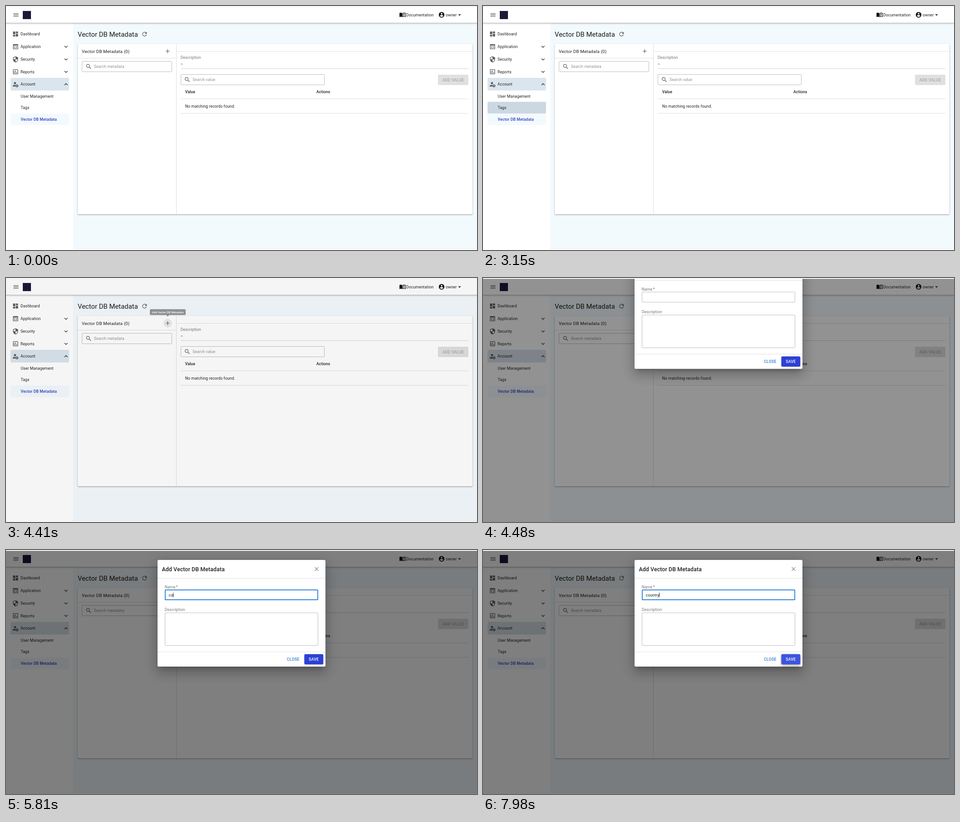
An HTML page with a canvas for the animation above (8 s loop, 1038x540 px).

```html
<!DOCTYPE html>
<html lang="en">
<head>
<meta charset="utf-8">
<title>Vector DB Metadata</title>
<style>
  html, body { margin: 0; width: 100%; height: 100%; overflow: hidden; background: #fff; }
  canvas { display: block; width: 1038px; height: 540px; }
</style>
</head>
<body>
<canvas id="stage" width="1038" height="540"></canvas>
<script>
const ctx = document.getElementById('stage').getContext('2d');
const LOOP = 8000, STEP = 70;
const UNIT = 0.62; // stage pixels per CSS pixel of the interface
const BODY = 14 * UNIT;
const INK = '#202020', GREY = '#757575', LINE = '#dedede', BORDER = '#bdbdbd';

const ICONS = {
  menu: 'M3 18h18v-2H3zm0-5h18v-2H3zm0-7v2h18V6z',
  book: 'M1 5.5C4 4 8 4 11.300 6v14.500C8 18.500 4 18.500 1 20zM12.700 6C16 4 20 4 23 5.500V20c-3-1.500-7-1.500-10.300.5zM14.500 7.500v10.300c2-.7 4.500-.7 6.700 0V7c-2.200-.7-4.700-.5-6.700.5zM16 10l4-.5v1.300l-4 .5zM16 13l4-.5v1.300l-4 .5z',
  user: 'M12 2a10 10 0 100 20 10 10 0 000-20zM12 5a3 3 0 110 6 3 3 0 010-6zM12 19.200c-2.500 0-4.710-1.280-6-3.220.03-1.990 4-3.080 6-3.080s5.970 1.090 6 3.080c-1.290 1.940-3.500 3.220-6 3.220z',
  drop: 'M7 10l5 5 5-5z',
  dashboard: 'M3 13h8V3H3zM3 21h8v-6H3zM13 21h8V11h-8zM13 3v6h8V3z',
  code: 'M3 3h18v18H3zM5 8v11h14V8zM10 9.500l1.200 1.200-2.700 2.800 2.700 2.800L10 17.500l-4-4zM14 9.500l-1.200 1.200 2.700 2.800-2.700 2.800 1.200 1.200 4-4z',
  shield: 'M12 1L3 5v6c0 5.550 3.840 10.740 9 12 5.160-1.260 9-6.450 9-12V5zM12 12h7c-.53 4.120-3.280 7.790-7 8.940V12H5V6.300l7-3.110z',
  chart: 'M5 3h14a2 2 0 012 2v14a2 2 0 01-2 2H5a2 2 0 01-2-2V5a2 2 0 012-2zM5 5v14h14V5zM7 10h2v7H7zM11 7h2v10h-2zM15 13h2v4h-2z',
  account: 'M10 4a4 4 0 100 8 4 4 0 000-8zM2 20v-2c0-3 4.500-4.300 9.700-4a7 7 0 00-.2 6zM16 12h2l.4 1.500 1.600.8 1.500-.4 1 1.700-1 1.200v1.400l1 1.200-1 1.700-1.500-.4-1.600.8L18 23h-2l-.4-1.500-1.600-.8-1.500.4-1-1.700 1-1.200v-1.400l-1-1.200 1-1.700 1.500.4 1.600-.8zM17 15.700a1.800 1.800 0 100 3.600 1.800 1.800 0 000-3.600z',
  down: 'M16.590 8.590L12 13.170 7.410 8.590 6 10l6 6 6-6z',
  up: 'M12 8l-6 6 1.410 1.410L12 10.830l4.590 4.580L18 14z',
  refresh: 'M17.650 6.350A8 8 0 1019.730 14h-2.080A6 6 0 1116.220 7.780L13 11h7V4z',
  search: 'M15.500 14h-.79l-.28-.27A6.500 6.500 0 1013.730 14.430l.27.28v.79l5 4.990L20.490 19zM9.500 14a4.500 4.500 0 110-9 4.500 4.500 0 010 9z',
  add: 'M19 13h-6v6h-2v-6H5v-2h6V5h2v6h6z',
  close: 'M19 6.100L17.900 5 12 10.900 6.100 5 5 6.100l5.900 5.900L5 17.900 6.100 19l5.900-5.900 5.900 5.900 1.100-1.100-5.900-5.900z'
};
for (const name in ICONS) ICONS[name] = new Path2D(ICONS[name]);

function icon(name, cx, cy, color = '#5c5c5c') {
  ctx.save();
  ctx.translate(cx - 12 * UNIT, cy - 12 * UNIT);
  ctx.scale(UNIT, UNIT);
  ctx.fillStyle = color;
  ctx.fill(ICONS[name], 'evenodd');
  ctx.restore();
}

// cy is the middle of the capital letters
function text(str, x, cy, { color = INK, size = BODY, weight = 400, gap = 0.0107, align = 'left' } = {}) {
  ctx.font = `${weight} ${size}px Roboto, sans-serif`;
  ctx.letterSpacing = `${gap * size}px`;
  ctx.textAlign = align;
  ctx.fillStyle = color;
  ctx.fillText(str, x, cy + size * 0.36);
}

function rect(x, y, w, h, color) {
  ctx.fillStyle = color;
  ctx.fillRect(x, y, w, h);
}

function box(x, y, w, h, r, color) {
  ctx.fillStyle = color;
  ctx.beginPath();
  ctx.roundRect(x, y, w, h, r);
  ctx.fill();
}

function outline(x, y, w, h, color = BORDER, width = 1) {
  ctx.strokeStyle = color;
  ctx.lineWidth = width;
  ctx.beginPath();
  ctx.roundRect(x + width / 2, y + width / 2, w - width, h - width, 1);
  ctx.stroke();
}

function withShadow(alpha, blur, dy, draw) {
  ctx.save();
  ctx.shadowColor = `rgba(0,0,0,${alpha})`;
  ctx.shadowBlur = blur;
  ctx.shadowOffsetY = dy;
  draw();
  ctx.restore();
}

const between = (t, a, b) => t >= a && t < b;
const clamp = v => Math.min(1, Math.max(0, v));
const easeOut = v => 1 - (1 - clamp(v)) ** 3;

function drawHeader() {
  withShadow(0.38, 4, 1, () => rect(-10, 0, 1058, 37, '#fff'));
  rect(0, 1, 1038, 1, '#ececec');
  icon('menu', 22, 19.7);
  rect(37, 11, 18, 18, '#1b1838');
  icon('book', 874, 19.5, '#111');
  text('Documentation', 882, 19.5);
  icon('user', 960, 19.5, '#111');
  text('owner', 969, 19.5);
  icon('drop', 999.5, 19.7, '#111');
}

function drawSidebar(t) {
  const rows = [
    ['Dashboard', 'dashboard', 62], ['Application', 'code', 90, 'down'],
    ['Security', 'shield', 118, 'down'], ['Reports', 'chart', 145.5, 'down'],
    ['Account', 'account', 173.3, 'up']
  ];
  box(10, 159, 129, 28, 2.5, '#dae5ee');
  for (const [label, glyph, y, arrow] of rows) {
    icon(glyph, 21, y);
    text(label, 32, y);
    if (arrow) icon(arrow, 132.3, y, INK);
  }
  const hover = '#ccd8e1';
  if (between(t, 3150, 3220)) box(10, 212, 129, 26, 2.5, hover);
  box(10, 238, 129, 25.500, 2.5, between(t, 2100, 3150) ? hover : '#f3fafe');
  text('User Management', 32.5, 199.7);
  text('Tags', 32.5, 225.2);
  text('Vector DB Metadata', 32.5, 250.6, { color: '#2f41c4', weight: 500 });
}

function drawPage(t) {
  rect(148, 38, 890, 498, '#f3fafe');
  rect(148, 536, 890, 1, '#e6ebee');
  text('Vector DB Metadata', 158, 62.3, { size: 24 * UNIT, gap: 0, color: '#1a1a1a' });
  icon('refresh', 305.3, 62.3);

  withShadow(0.42, 2.5, 1, () => box(158, 84, 870, 377, 2.5, '#fff'));
  rect(375, 84, 1, 377, LINE);
  rect(158, 115, 217, 1, LINE);
  rect(376, 100, 652, 1, '#e4e4e4');

  text('Vector DB Metadata (0)', 167, 100.2, { size: 16 * UNIT, gap: 0.0094 });
  if (between(t, 4200, 4480)) {
    ctx.fillStyle = '#ececec';
    ctx.beginPath();
    ctx.arc(356.3, 100, 9.7, 0, Math.PI * 2);
    ctx.fill();
  }
  icon('add', 356.3, 100);
  outline(167, 122, 199, 24, between(t, 3430, 3570) ? '#303030' : BORDER);
  icon('search', 182.3, 134);
  text('Search metadata', 193.7, 134, { color: '#929292' });

  text('Description', 384.8, 113.7, { color: GREY });
  text('--', 385, 128.3);
  rect(385, 138, 634, 1, '#d2d2d2');
  outline(385, 151, 317, 24);
  icon('search', 399.7, 163);
  text('Search value', 411, 163, { color: '#929292' });
  box(952, 152, 67, 23, 2.5, '#e0e0e0');
  text('ADD VALUE', 985.5, 163.4, { color: '#a6a6a6', weight: 500, gap: 0.0286, align: 'center' });
  text('Value', 394.7, 189.8, { weight: 500 });
  text('Actions', 684, 189.8, { weight: 500 });
  rect(385, 205, 634, 1, LINE);
  text('No matching records found.', 394.7, 221.4);
  rect(385, 237, 634, 1, LINE);
}

function drawTooltip(t) {
  if (!between(t, 4270, 4480)) return;
  ctx.save();
  ctx.globalAlpha = t < 4340 ? 0.5 : t < 4410 ? 0.92 : 0.66;
  ctx.fillStyle = '#616161';
  ctx.beginPath();
  ctx.roundRect(317, 69, 79, 13, 2.5);
  ctx.moveTo(353, 82);
  ctx.lineTo(359.500, 82);
  ctx.lineTo(356.3, 85.2);
  ctx.fill();
  ctx.globalAlpha = 1;
  text('Add Vector DB Metadata', 356.5, 75.6,
    { size: 10 * UNIT, weight: 500, gap: 0.012, color: '#fff', align: 'center' });
  ctx.restore();
}

function drawBackdrop(t) {
  if (t < 4410) return;
  rect(0, 2, 1038, 538, `rgba(0,0,0,${0.5 * easeOut((t - 4406) / 155)})`);
}

function drawNameField(t) {
  const focused = t >= 5250, hovered = t >= 4970;
  outline(350, 87.5, 338, 23.5, focused ? '#1976d2' : hovered ? '#303030' : BORDER, focused ? 1.7 : 1);
  if (!focused) return;
  const keyTimes = [5600, 5810, 6020, 6230, 6510, 6650, 6790];
  const typed = 'country'.slice(0, keyTimes.filter(k => t >= k).length);
  text(typed, 358.8, 99.4);
  if (!between(t, 7350, 7840)) {
    rect(358.8 + ctx.measureText(typed).width - 0.3, 94.5, 0.9, 10, '#111');
  }
}

function drawDialog(t) {
  if (t <= 4410) return;
  const x = 334, y = 22, w = 370, h = 236;
  ctx.save();
  ctx.beginPath();
  ctx.rect(0, 2, 1038, 538);
  ctx.clip();
  ctx.translate(0, -258 * (1 - easeOut((t - 4410) / 177)));

  const layers = [[0.2, 15, 11, -7], [0.14, 38, 24, 3], [0.12, 46, 9, 8]];
  for (const [alpha, blur, dy, spread] of layers) {
    const s = spread * UNIT;
    // The caster sits off stage so that only its shadow shows
    ctx.save();
    ctx.shadowOffsetX = 3000;
    ctx.shadowOffsetY = dy * UNIT;
    ctx.shadowBlur = blur * UNIT;
    ctx.shadowColor = `rgba(0,0,0,${alpha})`;
    box(x - s - 3000, y - s, w + 2 * s, h + 2 * s, 2.5 + Math.max(0, s), '#000');
    ctx.restore();
  }
  box(x, y, w, h, 2.5, '#fff');

  text('Add Vector DB Metadata', 343.4, 42.2, { size: 20 * UNIT, weight: 500, gap: 0.0075 });
  icon('close', 684.5, 42.2, '#747474');
  rect(x, 62, w, 1, '#e0e0e0');
  text('Name', 349.7, 81.6, { color: GREY });
  text('*', 374.7, 81.6, { color: '#d84343' });
  drawNameField(t);
  text('Description', 349.7, 132.3, { color: GREY });
  outline(350, 138.5, 338, 73.5);
  rect(x, 225, w, 1, '#e0e0e0');

  const caps = { weight: 500, gap: 0.0286, align: 'center' };
  text('CLOSE', 632.8, 241.7, { ...caps, color: '#2b78d4' });
  const hover = clamp((t - 7700) / 280);
  const mix = (a, b) => Math.round(a + (b - a) * hover);
  withShadow(0.3 + 0.15 * hover, 2.5 + 3 * hover, 1 + hover, () =>
    box(657.5, 230.5, 41.7, 22.5, 2.5, `rgb(${mix(44, 61)},${mix(64, 84)},${mix(214, 222)})`));
  text('SAVE', 678.4, 241.7, { ...caps, color: '#fff' });
  ctx.restore();
}

function draw(t) {
  rect(0, 0, 1038, 540, '#fff');
  drawPage(t);
  drawSidebar(t);
  drawHeader();
  drawBackdrop(t);
  drawTooltip(t);
  drawDialog(t);
}

const start = performance.now();
function tick() {
  const t = (performance.now() - start) % LOOP;
  draw(Math.floor(t / STEP) * STEP);
  requestAnimationFrame(tick);
}
tick();
</script>
</body>
</html>
```
